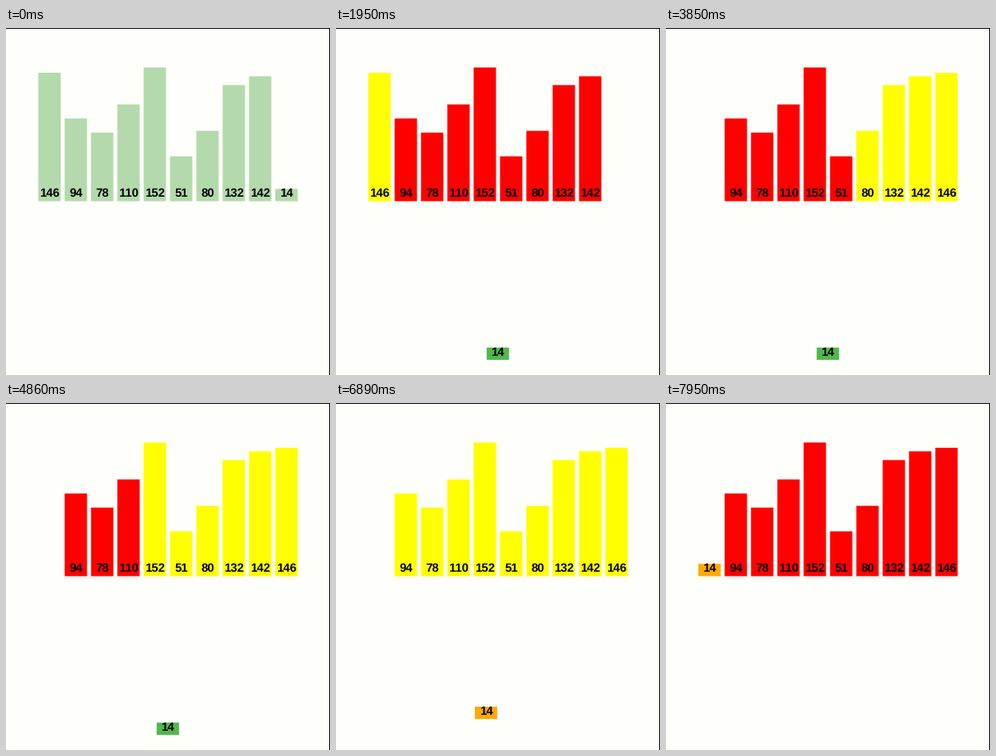
A matplotlib script that plays this animation: 406x434 px, repeating every 7.99 s.

```python
import matplotlib.pyplot as plt
from matplotlib.animation import FuncAnimation
from matplotlib.patches import Rectangle

plt.rcParams["text.hinting"] = "none"
plt.rcParams["text.hinting_factor"] = 1

W, H, DPI = 406, 434, 64
LOOP, STEP = 7990, 17

VALUES = [146, 94, 78, 110, 152, 51, 80, 132, 142, 14]
LAST = len(VALUES) - 1
LEFT, PITCH, BAR_W, FLOOR, SCALE = 40.5, 33, 28, 216.6, 1.1
PARKED = (188.8, 415.1)

PAPER = "#fefefa"
IDLE = "#b3d9ac"
ACTIVE = "#ff0000"
PIVOT = "#50b850"
PASSED = "#ffff00"
PLACED = "#ffaa00"

# Time at which each bar is compared with the pivot, by index
COMPARED = {0: 1860, 8: 2880, 7: 3360, 6: 3850, 5: 4340,
            4: 4860, 3: 5350, 2: 5880, 1: 6410}


def slot(i):
    return LEFT + PITCH * i, FLOOR


def lerp(a, b, p):
    return tuple(u + (v - u) * p for u, v in zip(a, b))


def progress(t, start, tick):
    """Linear 200 ms move, advancing in 40 ms ticks."""
    t = tick + (t - tick) // 40 * 40
    return min(max((t - start) / 200, 0), 1)


def color(i, t):
    if t < 360:
        return IDLE
    if i == LAST:
        return ACTIVE if t < 850 else PIVOT if t < 6890 else PLACED
    if t < COMPARED[i]:
        return ACTIVE
    return PASSED if t < 7380 else IDLE if t < 7820 else ACTIVE


def position(i, t):
    if i == 0:
        return lerp(slot(0), slot(LAST), progress(t, 2320, 2350))
    if i == LAST:
        if t < 6890:
            return lerp(slot(LAST), PARKED, progress(t, 1340, 1300))
        return lerp(PARKED, slot(0), progress(t, 6870, 6890))
    return slot(i)


fig = plt.figure(figsize=(W / DPI, H / DPI), dpi=DPI, facecolor=PAPER)
ax = fig.add_axes([0, 0, 1, 1])
ax.set_xlim(0, W)
ax.set_ylim(H, 0)
ax.axis("off")

ax.add_patch(Rectangle((0, 0), W, 1, color="black", lw=0))
ax.add_patch(Rectangle((W - 1, 0), 1, H, color="black", lw=0))

bars, labels = [], []
for i, value in enumerate(VALUES):
    bars.append(ax.add_patch(
        Rectangle((0, 0), BAR_W, -value * SCALE, lw=0, snap=False,
                  zorder=2 + i)))
    labels.append(ax.text(
        0, 0, str(value), family="Liberation Sans", weight="bold",
        size=15 * 72 / DPI, ha="center", va="baseline", zorder=2.5 + i))


def update(n):
    t = (n + 1) * STEP
    for i, (bar, label) in enumerate(zip(bars, labels)):
        x, y = position(i, t)
        bar.set_xy((x, y))
        bar.set_facecolor(color(i, t))
        label.set_position((x + BAR_W / 2, y - 5.6))
    return bars + labels


anim = FuncAnimation(fig, update, frames=LOOP // STEP, interval=STEP,
                     repeat=True, repeat_delay=0, blit=False)
plt.show()
```
